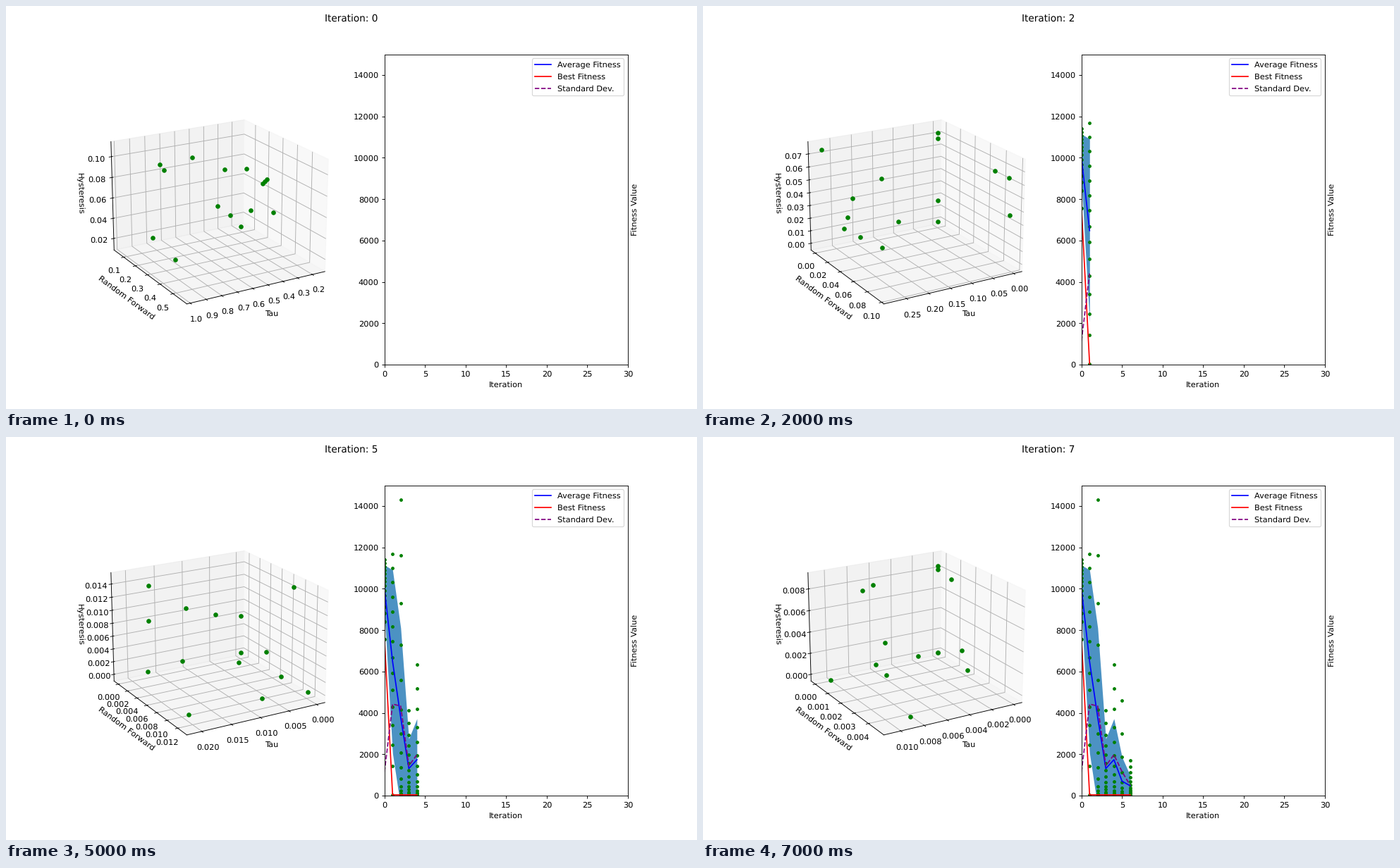
A matplotlib script for the animation above (8000 ms loop, 980x572 px).

```python
import matplotlib.pyplot as plt
import numpy as np
from matplotlib.animation import FuncAnimation
from matplotlib.ticker import MaxNLocator

W, H = 980, 572
DPI = W / 12
SIZE = 15  # individuals in the swarm
plt.rcParams["text.hinting"] = "no_hinting"

# Largest parameter values in the swarm, one per iteration
reach = {
    "x": [0.963, 0.826, 0.28, 0.0308, 0.0323, 0.02095, 0.0144, 0.01065],
    "y": [0.565, 0.2705, 0.096, 0.0276, 0.0157, 0.01274, 0.0083, 0.00471],
    "z": [0.1076, 0.184, 0.074, 0.0276, 0.02495, 0.01466, 0.01, 0.00884],
}
start = {"x": 0.17, "y": 0.0525, "z": 0.0151}  # smallest values at first
count = len(reach["x"])

# Fitness of the swarm after each iteration
average = np.array([10000, 6480, 3780, 1310, 1740, 700, 480])
deviation = np.array([1150, 4430, 4330, 1440, 1980, 1160, 500])
worst = np.array([11410, 11670, 14310, 4120, 6330, 4610, 1720])
best = np.full(count - 1, 40)
best[0] = 7560

# Spread the individuals from best to worst, skewed to meet the average
rank = np.linspace(0, 1, SIZE)[:, None]
scores = best + (worst - best) * rank ** ((worst - average) / (average - best))


def positions(n):
    """Relative places of the swarm in the box, from 0 to 1 on each axis."""
    rng = np.random.default_rng(n + 4)
    if n == 0:
        return rng.random((SIZE, 3))
    # Values pushed below zero stop there; the leader sits at the origin
    spots = rng.uniform(-0.6, 1, (SIZE, 3)).clip(0)
    spots[0] = 0
    return spots / spots.max(axis=0)


def fit_axis(name, low, high):
    """Set limits with a margin, and ticks that keep clear of the corners."""
    margin = 0.05 * (high - low)
    low, high = low - margin, high + margin
    ticks = MaxNLocator(9, steps=[1, 2, 2.5, 5, 10]).tick_values(low, high)
    edge = (high - low) / 48
    space.set(**{f"{name}ticks": ticks[(ticks >= low) & (ticks <= high)]})
    space.set(**{f"{name}lim": (low - edge, high + edge)})


fig = plt.figure(figsize=(W / DPI, H / DPI), dpi=DPI)
title = fig.suptitle("Iteration: 0")

space = fig.add_subplot(121, projection="3d")
space.view_init(elev=20, azim=60)
space.set(xlabel="Tau", ylabel="Random Forward", zlabel="Hysteresis")
points, = space.plot([], [], [], "go", ms=4.8)

chart = fig.add_subplot(122)
chart.set(xlim=(0, 30), ylim=(0, 15000),
          xlabel="Iteration", ylabel="Fitness Value")
chart.yaxis.set_label_position("right")
dots, = chart.plot([], [], "g.", ms=6.5, zorder=1.5)
curves = [
    (chart.plot([], [], color="blue", label="Average Fitness")[0], average),
    (chart.plot([], [], color="red", label="Best Fitness")[0], best),
    (chart.plot([], [], "--", color="purple", label="Standard Dev.")[0],
     deviation),
]
chart.legend(loc="upper right", labelspacing=0.53)
bands = []


def update(n):
    title.set_text(f"Iteration: {n}")

    coords = []
    for name, share in zip("xyz", positions(n).T):
        low, high = (0 if n else start[name]), reach[name][n]
        fit_axis(name, low, high)
        coords.append(low + (high - low) * share)
    points.set_data_3d(*coords)

    steps = np.arange(n)
    for line, values in curves:
        line.set_data(steps, values[:n])
    dots.set_data(np.tile(steps, SIZE), scores[:, :n].ravel())

    while bands:
        bands.pop().remove()
    if n > 1:
        mean, dev = average[:n], deviation[:n]
        bands.append(chart.fill_between(steps, mean - dev, mean + dev,
                                        color="C0", alpha=0.8, lw=0))


anim = FuncAnimation(fig, update, frames=count, interval=1000, repeat=True)
plt.show()
```
